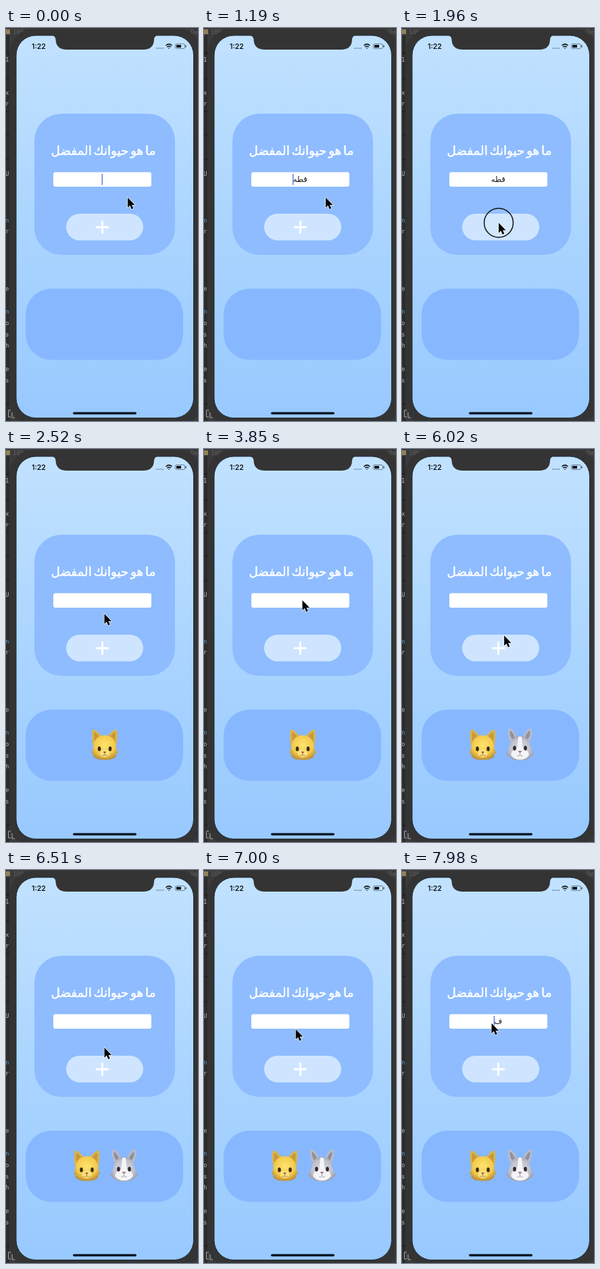
Write an HTML page that moves like this. It is 284 px wide and 582 px high and loops after 8000 ms.

```html
<!DOCTYPE html>
<html lang="ar">
<head>
<meta charset="utf-8">
<style>
  html, body { margin: 0; width: 100%; height: 100%; overflow: hidden; background: #343434; }
  svg { display: block; width: 100vw; height: 100vh; }
  .arabic { font-family: "DejaVu Sans", sans-serif; text-anchor: middle; direction: rtl; }
  .title { font-size: 18.3px; word-spacing: -3px; fill: #fff; stroke: #fff; stroke-width: .5px; }
  .editor { font: 9px "DejaVu Sans Mono", monospace; fill: #a5a5a5; }
</style>
</head>
<body>
<svg viewBox="0 0 284 582">
  <defs>
    <linearGradient id="sky" x2="0" y2="1">
      <stop stop-color="#c1e2ff"/><stop offset=".5" stop-color="#abd5ff"/><stop offset="1" stop-color="#98c9ff"/>
    </linearGradient>
    <radialGradient id="gold" cx=".5" cy=".4" r=".65">
      <stop stop-color="#ffe36f"/><stop offset=".6" stop-color="#f3ca4c"/><stop offset="1" stop-color="#b08434"/>
    </radialGradient>
    <radialGradient id="fur" cx=".5" cy=".5" r=".6">
      <stop stop-color="#d9dae0"/><stop offset=".6" stop-color="#c0c2cd"/><stop offset="1" stop-color="#9295a4"/>
    </radialGradient>
    <clipPath id="edge"><path d="M0 0H4.5V582H0Z"/></clipPath>
  </defs>

  <!-- editor window behind the phone -->
  <path fill="#3b3b3b" d="M0 0H284V582H0Z"/>
  <path fill="#2c2c2c" d="M0 11H5V582H0Z"/>
  <path fill="#b19a61" d="M0 2H6V9H0Z" opacity=".75"/>
  <g class="editor">
    <text x="10" y="9" opacity=".35">100</text>
    <text x="273" y="9" opacity=".35">De</text>
    <g id="code" clip-path="url(#edge)"></g>
  </g>
  <path d="M0 37H5M0 75H5M0 124H5M0 158H5M0 195H5M0 557H5" stroke="#151515"/>

  <!-- phone -->
  <rect x="5" y="1" width="285" height="588" rx="36" fill="#343434"/>
  <path d="M7 566H3.5V576H7M9 569V577H13" fill="none" stroke="#aaa"/>
  <rect x="15" y="11" width="262.500" height="566.500" rx="29" fill="url(#sky)" stroke="#1f2a36"/>
  <path fill="#343434" d="M66 10.5Q73 11 73.500 17Q74 32 90 32H203Q218.500 32 219 17Q219.500 11 226 10.500Z"/>
  <text x="38" y="31" font-family="Inter, sans-serif" font-size="10.5" font-weight="600" fill="#10151c">1:22</text>
  <path d="M222.500 30H233" stroke="#53708c" stroke-width="1.5" stroke-dasharray="1.5 1.5"/>
  <g fill="none" stroke="#10151c" stroke-width="1.5">
    <path d="M236.500 26Q241 21.800 245.500 26M238.300 28.200Q241 25.800 243.700 28.200"/>
    <rect x="250.500" y="23.500" width="14" height="7" rx="2" stroke-width=".8" opacity=".6"/>
  </g>
  <path fill="#10151c" d="M239.600 29.500H242.400L241 31ZM252 25H259V29H252ZM265.500 25.500H266.500V28.500H265.500Z"/>
  <rect x="99" y="568.800" width="94" height="3.400" rx="1.700" fill="#0c1826"/>

  <!-- question card -->
  <rect x="42" y="127" width="208" height="209" rx="40" fill="#8ebcff"/>
  <text class="arabic title" x="144" y="188">ما هو حيوانك المفضل</text>
  <rect x="70" y="213.500" width="145" height="21.500" rx="3" fill="#fff"/>
  <text id="answer" class="arabic" x="142.300" y="228" font-size="11.5" fill="#181818"></text>
  <path id="caret" d="M0 216V232.500" stroke="#4a6fd6" stroke-width="1.300"/>
  <rect x="89" y="275" width="114" height="39.500" rx="19.750" fill="#cfe5ff"/>
  <path id="plus" d="M133 295H152M142.500 285.500V304.500" stroke="#fff" stroke-width="3"/>

  <!-- animals card -->
  <rect x="29" y="386" width="233" height="105.500" rx="38" fill="#87b8ff"/>
  <g id="cat">
    <path fill="#e0b440" d="M-17 2Q-20 -15 -17.500 -22Q-15 -25 -5 -13H5Q15 -25 17.500 -22Q20 -15 17 2Z"/>
    <path fill="#c79a3c" d="M-15 -4Q-17 -14 -15.500 -19Q-12 -18 -7 -11ZM15 -4Q17 -14 15.500 -19Q12 -18 7 -11Z"/>
    <path fill="url(#gold)" d="M0 -14C11 -14 16 -7 17 4L19.500 12L16.500 14L17 17C12 22 6 22.500 0 22.500C-6 22.500 -12 22 -17 17L-16.500 14L-19.500 12L-17 4C-16 -7 -11 -14 0 -14Z"/>
    <ellipse cy="13" rx="7" ry="5.500" fill="#ffe58a" opacity=".8"/>
    <g fill="#3a2b16"><ellipse cx="-8" cy="6" rx="2.300" ry="3.600"/><ellipse cx="8" cy="6" rx="2.300" ry="3.600"/></g>
    <path fill="#8a5a34" d="M-2.500 10.500Q0 9.500 2.500 10.500L0 13Z"/>
    <path d="M0 13V15M-4 15.500Q-2 17 0 15Q2 17 4 15.500" fill="none" stroke="#a0752f" stroke-width=".8"/>
  </g>
  <g id="rabbit" transform="translate(174.500 438)">
    <path fill="#b9bbc6" d="M-13 -3C-19 -12 -18.500 -23 -15.500 -24.500C-10 -23 -5 -15 -4 -6ZM13 -3C19 -12 18.500 -23 15.500 -24.500C10 -23 5 -15 4 -6Z"/>
    <path fill="#8f909c" d="M-11 -7Q-16.500 -16 -14.500 -21Q-9 -17 -7 -9ZM11 -7Q16.500 -16 14.500 -21Q9 -17 7 -9Z"/>
    <path fill="url(#fur)" d="M0 -13C10 -13 14 -7 15.500 3L20.500 14L17 17C13 22 7 23 0 23C-7 23 -13 22 -17 17L-20.500 14L-15.500 3C-14 -7 -10 -13 0 -13Z"/>
    <path fill="#f3f4f8" d="M-2.500 -12H2.500L4 5Q14 9 13 16Q8 22 0 22Q-8 22 -13 16Q-14 9 -4 5Z"/>
    <g fill="#33292c"><ellipse cx="-8" cy="5" rx="2.300" ry="3.500"/><ellipse cx="8" cy="5" rx="2.300" ry="3.500"/></g>
    <path fill="#a98088" d="M-3 9.500Q0 8 3 9.500L0 12.500Z"/>
    <path d="M0 12.500V15M-4 16Q-2 18 0 15Q2 18 4 16" fill="none" stroke="#85818c" stroke-width=".8"/>
  </g>

  <g id="pointer">
    <circle id="ring" r="21.500" fill="#fff" fill-opacity=".08" stroke="#111" stroke-width="1.500"/>
    <path d="M0 0V15L3.400 11.800L5.700 17.200L8.300 16.100L6 10.900H10.600Z" fill="#050505" stroke="#fff" stroke-width="1.300" paint-order="stroke"/>
  </g>
</svg>
<script>
const LOOP = 8000, STEP = 70;
const $ = id => document.getElementById(id);

// Time, x, y of the pointer tip
const path = [
  [0, 180, 251], [1400, 180, 251], [1820, 143, 288.5], [2170, 143, 288.5],
  [2500, 145.5, 244], [2660, 145.5, 244], [3010, 145.5, 224], [4800, 145.5, 224],
  [5180, 156, 288], [5600, 156, 288], [6480, 145.5, 263], [6560, 145.5, 263],
  [7210, 132.5, 227], [LOOP, 132.5, 227]
];
// Time, field text, caret visible
const typing = [
  [0, "", true], [490, "ق", true], [770, "قط", true], [1050, "قطه", true],
  [1400, "قطه", false], [2240, "", false],
  [3920, "ا", true], [4130, "ار", true], [4340, "ارن", true], [4550, "ارنب", true],
  [4830, "ارنب", false], [5530, "", false],
  [7490, "", true], [7770, "ف", true]
];
const presses = [[1820, 2170], [5250, 5460]];
const catAt = 2240, rabbitAt = 5530;

const clamp = v => Math.max(0, Math.min(1, v));
const smooth = v => v * v * (3 - 2 * v);

// Line ends of the code visible beside the phone
const codeLines = [[50, "1"], [99, "x"], [115, "r"], [219, "U"], [288, "n"], [304, "r"], [389, "e"],
  [423, "n"], [440, "o"], [457, "s"], [473, "h"], [508, "e"], [525, "s"]];
$("code").innerHTML = codeLines.map(([y, s]) =>
  `<text x="-1" y="${y}" fill="${s === "n" ? "#5a9fd0" : "#b5b5b5"}">${s}</text>`).join("");

function pointerAt(t) {
  const i = path.findIndex(p => p[0] > t);
  const [a, x0, y0] = path[i - 1], [b, x1, y1] = path[i];
  const k = smooth((t - a) / (b - a));
  return [x0 + (x1 - x0) * k, y0 + (y1 - y0) * k];
}

const show = (id, on) => $(id).setAttribute("visibility", on ? "visible" : "hidden");
const move = (id, x, y) => $(id).setAttribute("transform", `translate(${x} ${y})`);

function draw(t) {
  move("pointer", ...pointerAt(t));
  show("ring", presses.some(([a, b]) => t >= a && t < b));
  const fade = Math.max(...presses.map(([a, b]) => Math.min(clamp((t - a) / 120), clamp((b + 120 - t) / 120))));
  $("plus").setAttribute("opacity", 1 - fade);

  const [, text, caret] = typing.filter(([start]) => start <= t).pop();
  if ($("answer").textContent !== text) $("answer").textContent = text;
  const width = text ? $("answer").getComputedTextLength() : 0;
  move("caret", 142.3 - width / 2, 0);
  show("caret", caret);

  show("cat", t >= catAt);
  show("rabbit", t >= rabbitAt);
  move("cat", t >= rabbitAt ? 119.5 : 146, 438);
}

function frame() {
  const t = performance.now() % LOOP;
  draw(Math.floor(t / STEP) * STEP);
  requestAnimationFrame(frame);
}
frame();
</script>
</body>
</html>
```
